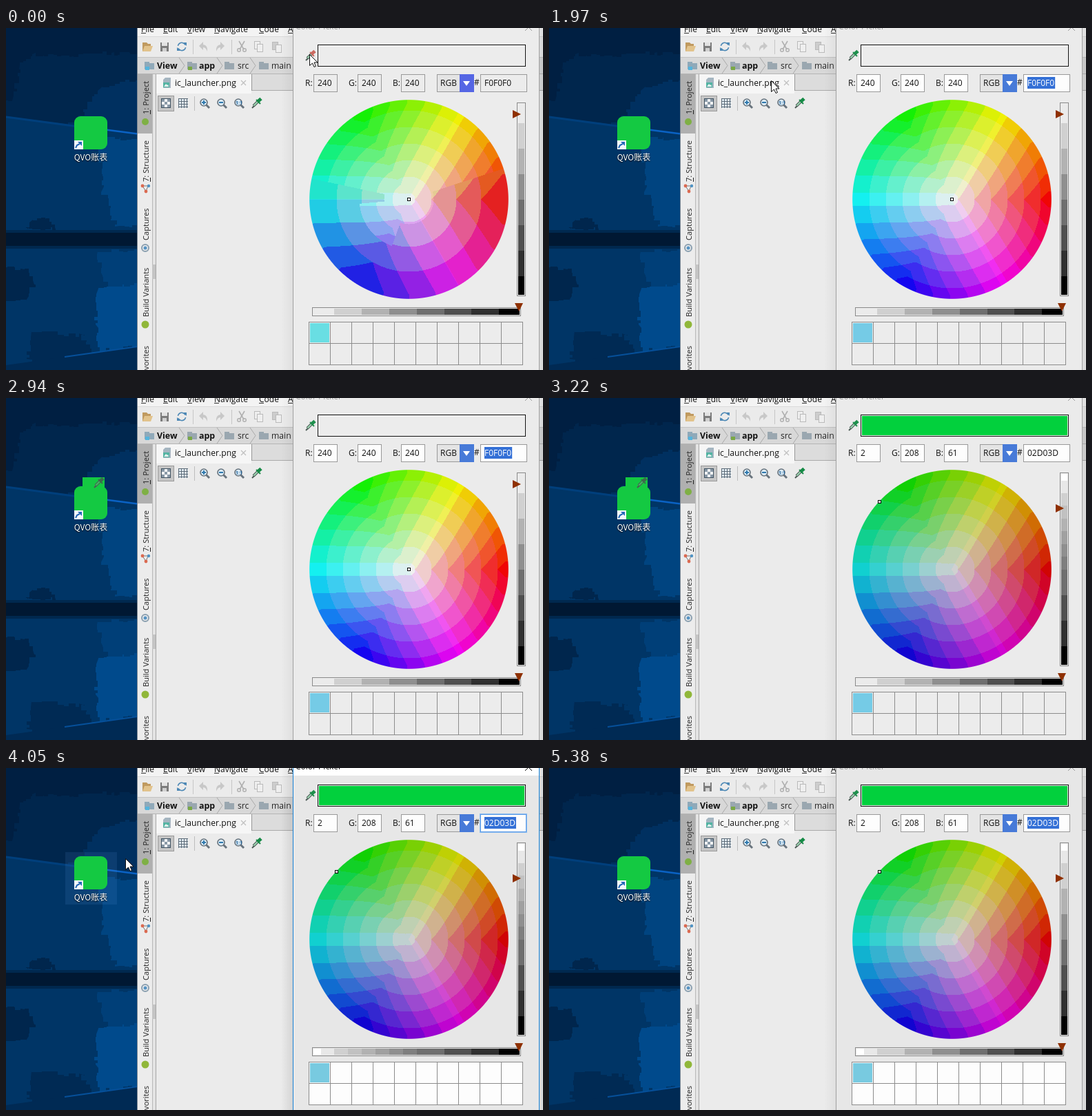
An HTML page with a canvas for the animation above (5480 ms loop, 779 by 496 pixels).

```html
<!DOCTYPE html>
<html lang="en">
<head>
<meta charset="utf-8">
<title>Color picker</title>
<style>
  html, body { margin: 0; width: 100%; height: 100%; overflow: hidden; background: #ebebeb; }
  canvas { display: block; width: 779px; height: 496px; }
</style>
</head>
<body>
<canvas id="stage" width="779" height="496"></canvas>
<script>
const canvas = document.getElementById('stage');
const c = canvas.getContext('2d');
const LOOP = 5480;
const UI = '"Open Sans", "Noto Sans", sans-serif';
const CJK = '"Noto Sans CJK SC", "Noto Sans CJK", sans-serif';

// Each step changes part of the scene state from its time on.
const idle = { active: false, ring: false };
const steps = [
  [0, { ...idle, wheel: 'coarse', bg: '#ececec', paper: '#ececec', cell: '#ececec', swatch: '#69dee3', hot: true,
        sel: false, rgb: [240, 240, 240], hex: 'F0F0F0', fill: '#ececec', mark: [584, 248], knob: 125,
        vbar: 0, hbar: 0, arrow: [440, 38], pick: null, hover: false }],
  [1400, { active: true, ring: true, sel: true, wheel: 'light', bg: '#e6e6e6', paper: '#fdfdfd', cell: '#fafafa',
           fill: '#fafafa', swatch: '#75cbe6', hot: false, vbar: 1, hbar: 1 }],
  [1550, { ...idle, bg: '#ebebeb', cell: '#ececec', fill: '#ececec', vbar: 0, hbar: 0 }],
  [1700, { arrow: null, pick: [443, 41] }],
  [1850, { arrow: [390, 58], pick: null }],
  [1970, { arrow: [322, 76] }],
  [2120, { arrow: null, pick: [330, 72] }],
  [2240, { arrow: [143, 124], pick: null }],
  [2390, { arrow: null, pick: [138, 127] }],
  [2520, { pick: [133, 129] }],
  [2670, { pick: [129, 130] }],
  [2790, { pick: [127, 131] }],
  [3220, { wheel: 'dark', rgb: [2, 208, 61], hex: '02D03D', fill: '#02d03d', mark: [479, 150], knob: 160,
           sel: false, vbar: 2 }],
  [3370, { active: true, ring: true, sel: true, bg: '#e7e7e7', cell: '#fdfdfd', swatch: '#78cae0', hbar: 2,
           arrow: [124, 130], pick: null }],
  [3500, { hover: true }],
  [3900, { arrow: [145, 130] }],
  [4050, { arrow: [173, 131] }],
  [4170, { arrow: [302, 148], hover: false }],
  [4290, { arrow: [459, 220], vbar: 1 }],
  [4430, { arrow: [556, 310] }],
  [4550, { arrow: [648, 394] }],
  [4680, { arrow: [711, 461] }],
  [4830, { arrow: [719, 482] }],
  [4960, { arrow: null }],
  [5380, { ...idle, hbar: 1 }]
];
const states = [];
steps.forEach(([at, change], i) => states.push({ ...states[i - 1], ...change, at }));

function box(x, y, w, h, color) { c.fillStyle = color; c.fillRect(x, y, w, h); }
function frame(x, y, w, h, color) { c.strokeStyle = color; c.lineWidth = 1; c.strokeRect(x + .5, y + .5, w - 1, h - 1); }
function poly(color, ...p) {
  c.beginPath();
  for (let i = 0; i < p.length; i += 2) c.lineTo(p[i], p[i + 1]);
  c.closePath();
  c.fillStyle = color;
  c.fill();
}
function line(color, width, ...p) {
  c.beginPath();
  for (let i = 0; i < p.length; i += 2) c[i ? 'lineTo' : 'moveTo'](p[i], p[i + 1]);
  c.strokeStyle = color;
  c.lineWidth = width;
  c.stroke();
}
function disc(x, y, r, color, hollow) {
  c.beginPath();
  c.arc(x, y, r, 0, 7);
  c.fillStyle = c.strokeStyle = color;
  c.lineWidth = hollow || 1;
  hollow ? c.stroke() : c.fill();
}
function text(s, x, y, color = '#111', size = 12, weight = 400, family = UI) {
  c.font = `${weight} ${size}px ${family}`;
  c.fillStyle = color;
  c.fillText(s, x, y);
}

// Blocky outline: walks between the points in small ragged stairs.
function ragged(color, seed, ...p) {
  const rnd = () => { const v = Math.sin(seed++ * 78.233) * 43758.5453; return v - Math.floor(v) - .5; };
  c.beginPath();
  for (let i = 0; i < p.length; i += 2) {
    const j = (i + 2) % p.length, n = Math.ceil(Math.hypot(p[j] - p[i], p[j + 1] - p[i + 1]) / 7);
    let y = p[i + 1];
    for (let k = 0; k < n; k++) {
      const x = Math.round(p[i] + (p[j] - p[i]) * k / n + rnd() * 8);
      c.lineTo(x, y);
      y = Math.round(p[i + 1] + (p[j + 1] - p[i + 1]) * k / n + rnd() * 6);
      c.lineTo(x, y);
    }
  }
  c.fillStyle = color;
  c.fill();
}

function wallpaper() {
  c.save();
  c.beginPath();
  c.rect(0, 0, 191, 496);
  c.clip();
  box(0, 0, 191, 496, '#003566');
  box(0, 0, 191, 155, '#00264d');
  ragged('#001f42', 9, -9, -9, 200, -9, 200, 40, 150, 36, 90, 42, 40, 38, 20, 60, 12, 105, -9, 110);
  ragged('#003060', 14, 140, 85, 200, 70, 200, 160, 90, 145);
  poly('#003566', 0, 128, 191, 153, 191, 300, 0, 300);
  ragged('#004480', 21, 135, 158, 200, 164, 200, 288, 160, 288, 140, 230);
  ragged('#00264d', 33, 38, 278, 60, 276, 75, 292, 28, 292);
  line('#003f7c', 3, 0, 129, 120, 145);
  line('#0a62c4', 2.5, 110, 143, 191, 153.5);
  box(0, 293, 191, 27, '#00284f');
  box(0, 297, 191, 19, '#001833');
  ragged('#003f78', 45, 135, 324, 200, 324, 200, 400, 160, 390, 138, 360);
  ragged('#004a8c', 69, 135, 378, 200, 370, 200, 462, 140, 468, 130, 430);
  ragged('#00264d', 57, -9, 348, 28, 350, 45, 372, 30, 395, -9, 402);
  ragged('#002a54', 81, 40, 440, 110, 446, 125, 478, 70, 500, 30, 480);
  poly('#002a54', 0, 489, 191, 462, 191, 496, 0, 496);
  line('#06509a', 2, 85, 477, 191, 462);
  c.restore();
}

function desktopIcon(s) {
  if (s.hover) box(86, 122, 75, 76, 'rgba(120,180,255,.1)');
  c.beginPath();
  c.roundRect(99, 128, 48, 48, 9);
  c.fillStyle = '#14c942';
  c.fill();
  box(99, 163, 13, 13, '#f4f8fc');
  line('#2468b8', 2, 101, 174, 103, 170, 107, 168);
  poly('#2468b8', 104, 165, 110, 165, 110, 171);
  c.textAlign = 'center';
  c.shadowColor = '#000';
  c.shadowBlur = 2;
  c.shadowOffsetY = 1;
  text('QVO账表', 123, 192, '#fff', 12, 400, CJK);
  c.shadowColor = 'transparent';
  c.shadowBlur = c.shadowOffsetY = 0;
  c.textAlign = 'left';
}

function folder(x, y, color, dot) {
  box(x, y + 1, 7, 3, color);
  box(x, y + 3, 14, 9, color);
  if (dot) box(x + 1, y + 8, 6, 5, dot);
}
function dropper(x, y, tip, bulb) {
  line('#4b5a55', 4, x + 3, y + 12, x + 10, y + 5);
  line(tip, 2, x + 3, y + 12, x + 9, y + 6);
  line('#4b5a55', 2, x + 1, y + 15, x + 4, y + 12);
  line(bulb, 5, x + 9.5, y + 5.5, x + 14, y + 1.5);
  line(bulb, 2, x + 7, y + 3, x + 13, y + 9);
}
function lens(x, y, sign) {
  line('#69747e', 3, x + 9, y + 9, x + 14, y + 14);
  disc(x + 6, y + 6, 5, '#dcebf5');
  disc(x + 6, y + 6, 5, '#66727c', 1.6);
  if (sign === '1:1') return text(sign, x + 2, y + 9, '#21639b', 7, 700);
  box(x + 3, y + 5, 6, 2, '#2f79ae');
  if (sign === '+') box(x + 5, y + 3, 2, 6, '#2f79ae');
}
function undo(x, d) {
  c.beginPath();
  c.moveTo(x - 6 * d, 26);
  c.lineTo(x, 20);
  c.lineTo(x, 24);
  c.quadraticCurveTo(x + 7 * d, 25, x + 6 * d, 34);
  c.quadraticCurveTo(x + 4 * d, 28, x, 28);
  c.lineTo(x, 32);
  c.fillStyle = '#c8c8c8';
  c.fill();
}
function sideLabel(s, bottom, under) {
  c.save();
  c.translate(207, bottom);
  c.rotate(-Math.PI / 2);
  text(s, 0, 0, '#222', 11.1);
  if (under) box(0, 2, 6, 1, '#222');
  c.restore();
}

function ide() {
  box(191, 0, 588, 496, '#ebebeb');
  box(191, 0, 588, 12, '#f3f3f3');
  box(191, 12, 588, 1, '#dadada');
  [['File', 196], ['Edit', 228], ['View', 263], ['Navigate', 302], ['Code', 367], ['Analyze', 409]]
    .forEach(([s, x]) => { text(s, x, 6); box(x, 7, 7, 1, '#333'); });

  poly('#c09a60', 198, 21, 204, 21, 206, 23, 210, 23, 210, 34, 198, 34);
  poly('#e2c38c', 201, 26, 213, 26, 210, 34, 198, 34);
  box(224, 21, 12, 13, '#7c7c7c');
  box(226, 21, 8, 5, '#e2e2e2');
  box(227, 29, 6, 5, '#d0d0d0');
  c.lineWidth = 1.6;
  c.strokeStyle = '#4d88b5';
  [.2, 3.34].forEach(a => { c.beginPath(); c.arc(255, 27, 5.7, a, a + 2.5); c.stroke(); });
  poly('#4d88b5', 257, 21, 262, 21, 262, 26);
  poly('#4d88b5', 248, 28, 248, 33, 253, 33);
  [271, 327].forEach(x => box(x, 17, 1, 21, '#c6c6c6'));
  undo(286, 1);
  undo(311, -1);
  line('#b0b0b0', 1.6, 338, 19, 345, 31);
  line('#b0b0b0', 1.6, 346, 19, 339, 31);
  disc(338, 32, 2.3, '#b0b0b0', 1.4);
  disc(346, 32, 2.3, '#b0b0b0', 1.4);
  [[360, 19], [364, 23], [386, 20], [391, 24]].forEach(([x, y], i) => {
    box(x, y, 9, 12, i === 2 ? '#cdcdcd' : '#efefef');
    frame(x, y, 9, 12, '#bababa');
  });

  box(191, 42, 588, 1, '#c3c3c3');
  box(191, 43, 588, 23, '#d8d8d8');
  box(191, 66, 588, 1, '#b5b5b5');
  folder(201, 48, '#8fa9b9', '#56b4dc');
  folder(263, 48, '#9aa7b0', '#7aa845');
  folder(317, 48, '#9aa7b0');
  folder(367, 48, '#9aa7b0');
  text('View', 219, 59, '#111', 12.4, 700);
  text('app', 280, 59, '#111', 12.4, 700);
  text('src', 336, 59, '#222', 12.2);
  text('main', 385, 59, '#222', 12.2);
  [251, 306, 354].forEach(x => line('#aaa', 1, x, 43, x + 8, 54.5, x, 66));

  box(191, 67, 22, 429, '#ececec');
  box(191, 67, 22, 86, '#b0b0b0');
  box(190, 0, 1, 496, '#7d8894');
  box(212, 67, 1, 429, '#b8b8b8');
  box(213, 67, 4, 429, '#e4e4e4');
  box(212, 343, 5, 21, '#c4c4c4');
  box(217, 67, 1, 429, '#a5a5a5');
  sideLabel('1: Project', 125, true);
  sideLabel('7: Structure', 223, true);
  sideLabel('Captures', 308);
  sideLabel('Build Variants', 419);
  sideLabel('2: Favorites', 520);
  disc(202, 136, 5, '#7fb045');
  line('#777', 1, 198, 229, 206, 229, 203, 237, 198, 229);
  disc(198, 229, 2.4, '#db6a51');
  disc(207, 229, 2.2, '#4f93c4');
  disc(203, 237, 2.4, '#db6a51');
  disc(202, 319, 5, '#8ba0b0', 2);
  disc(202, 319, 2.5, '#5794c4');
  disc(202, 430, 5.5, '#90b73a');

  box(218, 67, 561, 24, '#dcdcdc');
  box(218, 90, 561, 1, '#aaa');
  box(218, 67, 138, 28, '#f6f6f6');
  box(356, 67, 1, 24, '#999');
  poly('#a5b6c1', 231, 72, 239, 72, 239, 87, 228, 87, 228, 75);
  box(228, 79, 9, 7, '#53b3a2');
  poly('#e6f2f0', 229, 85, 232, 81, 234, 83, 235, 82, 236, 85);
  text('ic_launcher.png', 245, 84, '#111', 12.15);
  line('#c0c0c0', 1.2, 341, 76, 348, 83);
  line('#c0c0c0', 1.2, 348, 76, 341, 83);

  box(220, 98, 24, 23, '#c6c6c6');
  frame(220, 98, 24, 23, '#999');
  box(225, 102, 14, 14, '#f6f6f6');
  for (let i = 0; i < 9; i += 2) box(226 + i % 3 * 4, 103 + Math.floor(i / 3) * 4, 4, 4, '#8a9aa8');
  frame(225, 102, 14, 14, '#3f5261');
  box(250, 102, 14, 14, '#e4eef5');
  for (let i = 0; i < 4; i++) {
    box(250 + i * 4, 102, 1, 14, '#5b6a77');
    box(250, 102 + i * 4, 14, 1, '#5b6a77');
  }
  box(273, 99, 1, 21, '#bcbcbc');
  lens(281, 102, '+');
  lens(306, 102, '-');
  lens(331, 102, '1:1');
  dropper(356, 101, '#9fd8b4', '#168a46');
}

// Channel loss (0..1) snapped to the middle of its band; sizes in wheel pixels.
function snap(loss, band, shift) {
  if (loss < .004) return 0;
  const k = Math.floor((loss * 144 + shift) / band);
  return Math.max(0, ((k + .5) * band - shift) / 144);
}
// Posterised hue/saturation disc; red is banded apart from green and blue.
function makeWheel(value, coarse) {
  const size = 289, mid = size / 2, off = document.createElement('canvas');
  off.width = off.height = size;
  const o = off.getContext('2d'), img = o.createImageData(size, size);
  for (let y = 0, i = 0; y < size; y++) for (let x = 0; x < size; x++) {
    const dx = x + .5 - mid, dy = mid - y - .5, r = Math.hypot(dx, dy);
    const hue = (Math.atan2(dy, dx) * 180 / Math.PI + 360) % 360, sat = Math.min(r / 144, .97);
    const inner = hue > 185 && hue < 250 ? .5 : .25;
    const rough = coarse && sat > inner && (hue < 18 || hue > 168);
    for (const n of [5, 3, 1]) {
      const k = (n + hue / 60) % 6;
      const loss = sat * Math.max(0, Math.min(k, 4 - k, 1));
      const cut = rough ? snap(loss, 36, 3) : snap(loss, 24, n === 5 ? 0 : 15);
      img.data[i++] = (rough ? value - 12 : value) * (1 - cut);
    }
    img.data[i++] = 255 * Math.max(0, Math.min(1, 144.8 - r));
  }
  o.putImageData(img, 0, 0);
  return off;
}
const wheels = { coarse: makeWheel(240, true), light: makeWheel(240), dark: makeWheel(208) };

// Grey ramp in bands; mode 1 adds a white end, mode 2 also splits the light bands.
function ramp(x, y, w, h, mode) {
  const tones = [235, 208, 178, 143, 111, 80, 48, 0], tall = h > w, len = tall ? h : w;
  const band = (from, g) => {
    const p = Math.round(from * len), color = `rgb(${g},${g},${g})`;
    tall ? box(x, y + p, w, h - p, color) : box(x + p, y, w - p, h, color);
  };
  tones.forEach((g, i) => {
    band(i ? .1 + .1335 * (i - 1) : 0, g);
    if (!i && mode) { band(0, 255); band(.037, 232); }
    if (mode === 2 && i && i < 4) band(.1 + .1335 * (i - .5), (g + tones[i + 1]) >> 1);
  });
  frame(x - 2, y - 2, w + 4, h + 4, '#8a8a8a');
}
function field(x, w, s, paper) {
  box(x, 67, w, 26, paper);
  frame(x, 67, w, 26, '#999');
  text(s, x + 6, 84);
}

function dialog(s) {
  const edge = s.active ? '#1883d7' : '#a0a0a0', ink = s.active ? '#111' : '#999';
  const g = c.createLinearGradient(399, 0, 417, 0);
  g.addColorStop(0, 'rgba(0,0,0,0)');
  g.addColorStop(1, s.active ? 'rgba(0,0,0,.1)' : 'rgba(0,0,0,.05)');
  box(399, 0, 18, 496, g);
  box(774, 0, 5, 496, 'rgba(0,0,0,.08)');
  box(416, 0, 358, 496, edge);
  box(417, 0, 356, 496, s.bg);
  if (s.active) box(417, 0, 356, 11, '#fff');
  text('Color Picker', 420, 2, ink);
  line(ink, 1, 753, -6, 763, 4);
  line(ink, 1, 763, -6, 753, 4);

  dropper(434, 32, '#9fd8b4', s.hot ? '#cc6a60' : '#1f8f4d');
  box(452, 24, 302, 32, '#f0f0f0');
  frame(452, 24, 302, 32, '#111');
  box(454, 26, 298, 28, s.fill);

  [['R:', 434, 446], ['G:', 497, 510], ['B:', 561, 573]].forEach(([name, x, fx], i) => {
    text(name, x, 84);
    field(fx, 35, s.rgb[i], s.paper);
  });
  box(625, 67, 54, 26, '#e4e4e4');
  frame(625, 67, 54, 26, '#999');
  box(658, 67, 21, 26, s.hot ? '#5566e4' : '#477ad8');
  poly('#fff', 663, 77, 673, 77, 668, 84);
  text('RGB', 630, 84);
  text('#', 679, 83);
  field(688, 68, s.hex, s.paper);
  if (s.sel) {
    const w = c.measureText(s.hex).width;
    box(694, 71, w + 1, 17, '#3470d6');
    text(s.hex, 694, 84, '#fff');
  }
  if (s.ring) {
    frame(687, 66, 69, 28, '#8bbcf0');
    frame(688, 67, 67, 26, '#5c9be6');
  }

  c.drawImage(wheels[s.wheel], 440, 104);
  const [mx, my] = s.mark;
  box(mx - 2, my - 2, 5, 5, '#000');
  box(mx - 1, my - 1, 3, 3, '#fff');

  ramp(743, 110, 9, 277, s.vbar);
  ramp(446, 407, 299, 9, s.hbar);
  poly('#8f3000', 735, s.knob - 6, 747, s.knob, 735, s.knob + 6);
  poly('#8f3000', 738, 399, 750, 399, 744, 411);

  box(439, 426, 311, 63, s.cell);
  box(441, 428, 28, 28, s.swatch);
  for (let i = 0; i <= 10; i++) box(439 + i * 31, 426, 1, 63, '#8c8c8c');
  for (let i = 0; i < 3; i++) box(439, 426 + i * 31, 311, 1, '#8c8c8c');
}

function pointer(x, y) {
  c.save();
  c.translate(x + .5, y + .5);
  poly('#fff', 0, 0, 0, 16, 4, 12.5, 6.5, 18, 9, 17, 6.5, 11.5, 11.5, 11.5);
  c.strokeStyle = '#111';
  c.lineWidth = 1;
  c.stroke();
  c.restore();
}
// Enlarged pixels around the hot spot, with a dropper in the upper right.
function picker(x, y) {
  c.imageSmoothingEnabled = false;
  c.drawImage(canvas, x - 2, y - 2, 4, 4, x - 16, y - 16, 32, 32);
  c.imageSmoothingEnabled = true;
  dropper(x, y - 16, '#3fbf60', '#3d6b4c');
}

function play() {
  const t = performance.now() % LOOP;
  const s = states.filter(k => k.at <= t).pop();
  wallpaper();
  desktopIcon(s);
  ide();
  dialog(s);
  if (s.arrow) pointer(...s.arrow);
  if (s.pick) picker(...s.pick);
  requestAnimationFrame(play);
}
play();
</script>
</body>
</html>
```
